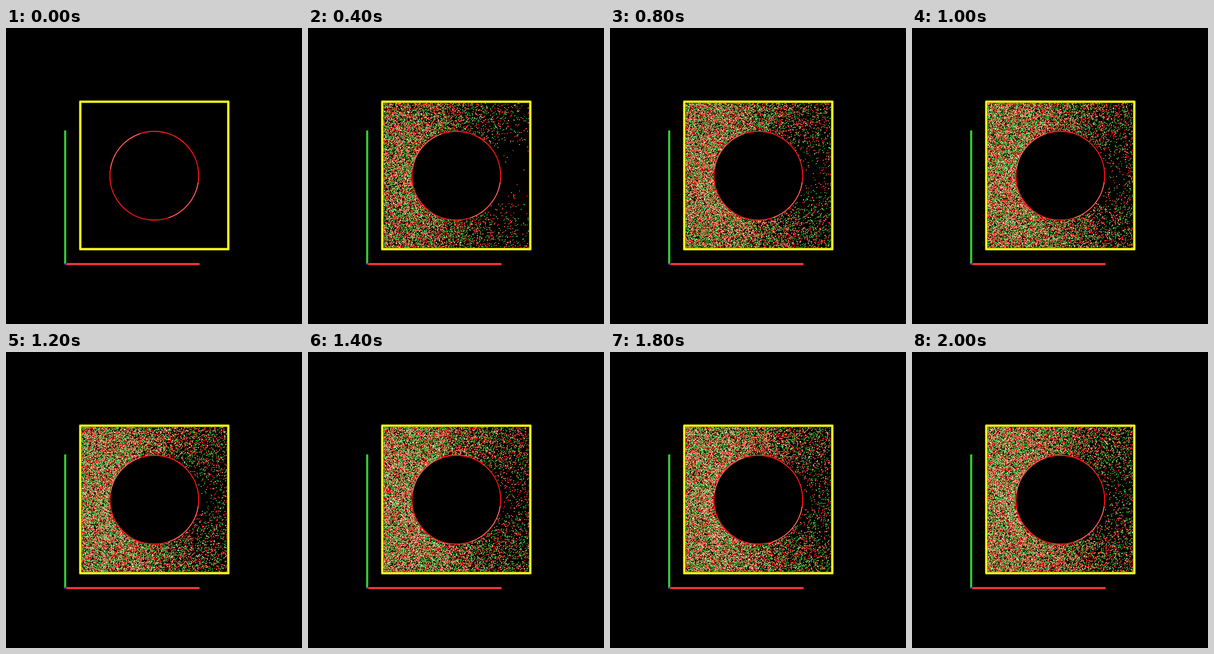
Animation, 512 px wide and 512 px high, one loop 2.1 s. Source, as an HTML page with a canvas:

```html
<!DOCTYPE html>
<html>
<head>
<meta charset="utf-8">
<style>
html, body { margin: 0; width: 100%; height: 100%; overflow: hidden; background: #000; }
canvas { display: block; }
</style>
</head>
<body>
<canvas id="stage" width="512" height="512"></canvas>
<script>
const g = document.getElementById('stage').getContext('2d');
const FRAMES = 21, STEP = 100, SUB = 10;
const box = { l: 128.5, t: 127.5, r: 384.5, b: 383.5 };
const disc = { x: 256.5, y: 255.5, r: 77 };
const DRIFT = 12.8, THERMAL = 51.5, DENSITY = 0.58; // px per frame, particles per px²

let seed = 12345;
function rnd() {
  seed = (seed + 0x6D2B79F5) | 0;
  let t = Math.imul(seed ^ seed >>> 15, 1 | seed);
  t = t + Math.imul(t ^ t >>> 7, 61 | t) ^ t;
  return ((t ^ t >>> 14) >>> 0) / 4294967296;
}
const speed = () => THERMAL * Math.sqrt(-Math.log(1 - rnd()));
const gauss = () => speed() * Math.cos(2 * Math.PI * rnd());

// Gas enters from a reservoir left of the box.
function inject(parts, dt) {
  const depth = (DRIFT + 3 * THERMAL) * dt;
  const count = Math.round(DENSITY * depth * (box.b - box.t));
  for (let i = 0; i < count; i++) {
    const vx = DRIFT + gauss();
    const x = box.l - depth * rnd();
    if (x + vx * dt < box.l) continue;
    parts.push({
      x, y: box.t + rnd() * (box.b - box.t), vx, vy: gauss(),
      kind: rnd() < 0.5 ? 0 : 1, lit: rnd() < 0.5
    });
  }
}

function move(p, dt) {
  p.x += p.vx * dt;
  p.y += p.vy * dt;
  if (p.y < box.t) { p.y = 2 * box.t - p.y; p.vy *= -1; }
  if (p.y > box.b) { p.y = 2 * box.b - p.y; p.vy *= -1; }
  const dx = p.x - disc.x, dy = p.y - disc.y, d = Math.hypot(dx, dy);
  if (d < disc.r) {
    // Diffuse reflection: forget the old velocity, leave along the normal.
    const nx = dx / d, ny = dy / d, out = speed(), side = gauss();
    p.x = disc.x + nx * disc.r;
    p.y = disc.y + ny * disc.r;
    p.vx = nx * out - ny * side;
    p.vy = ny * out + nx * side;
  }
  return p.x >= box.l && p.x <= box.r;
}

function simulate() {
  const shots = [[]];
  let parts = [];
  while (shots.length < FRAMES) {
    for (let s = 0; s < SUB; s++) {
      inject(parts, 1 / SUB);
      parts = parts.filter(p => move(p, 1 / SUB));
    }
    shots.push(parts.map(({ x, y, kind, lit }) => ({ x: x | 0, y: y | 0, kind, lit })));
  }
  return shots;
}

function rect(color, x, y, w, h) {
  g.fillStyle = color;
  g.fillRect(x, y, w, h);
}
function arc(color, width, from, to) {
  g.strokeStyle = color;
  g.lineWidth = width;
  g.beginPath();
  g.arc(disc.x, disc.y, disc.r - 0.2, from, to);
  g.stroke();
}

// Glints lie nearest to the viewer, so they go over all the bodies.
const body = ['#ff1010', '#109a10'], glint = ['#ffc8c0', '#c8f0c0'];
function drawGas(parts) {
  for (const p of parts) {
    rect(body[p.kind], p.x, p.y, 2, 1);
    g.fillRect(p.x, p.y + 1, 1, 1);
  }
  for (const p of parts) if (p.lit) rect(glint[p.kind], p.x, p.y, 1, 1);
}

function drawDisc() {
  g.fillStyle = '#000';
  g.beginPath();
  g.arc(disc.x, disc.y, disc.r, 0, 7);
  g.fill();
  arc('#ff1414', 1.9, 0, 7);
  arc('#ffb0a0', 0.9, 0.15, 1.25);
  arc('#ffb0a0', 0.9, Math.PI + 0.15, Math.PI + 1.25);
}

function drawFrame() {
  g.lineJoin = 'round';
  for (const [color, width] of [['#808000', 5], ['#ffff24', 3]]) {
    g.strokeStyle = color;
    g.lineWidth = width;
    g.strokeRect(128.5, 127.5, 256, 255);
  }
}

function drawAxes() {
  rect('#064806', 100, 177, 5, 232);
  rect('#20a820', 101, 177, 3, 231);
  rect('#48dc48', 101, 178, 2, 229);
  rect('#600a0a', 104, 406, 231, 5);
  rect('#d82020', 104, 407, 231, 3);
  rect('#ff4848', 105, 407, 229, 2);
  rect('#2020ff', 101, 407, 3, 3);
  rect('#9090ff', 101, 407, 1, 1);
}

const shots = simulate();
let shown = -1;
function tick() {
  const n = Math.floor(performance.now() / STEP) % FRAMES;
  if (n !== shown) {
    shown = n;
    rect('#000', 0, 0, 512, 512);
    drawGas(shots[n]);
    drawDisc();
    drawFrame();
    drawAxes();
  }
  requestAnimationFrame(tick);
}
tick();
</script>
</body>
</html>
```
